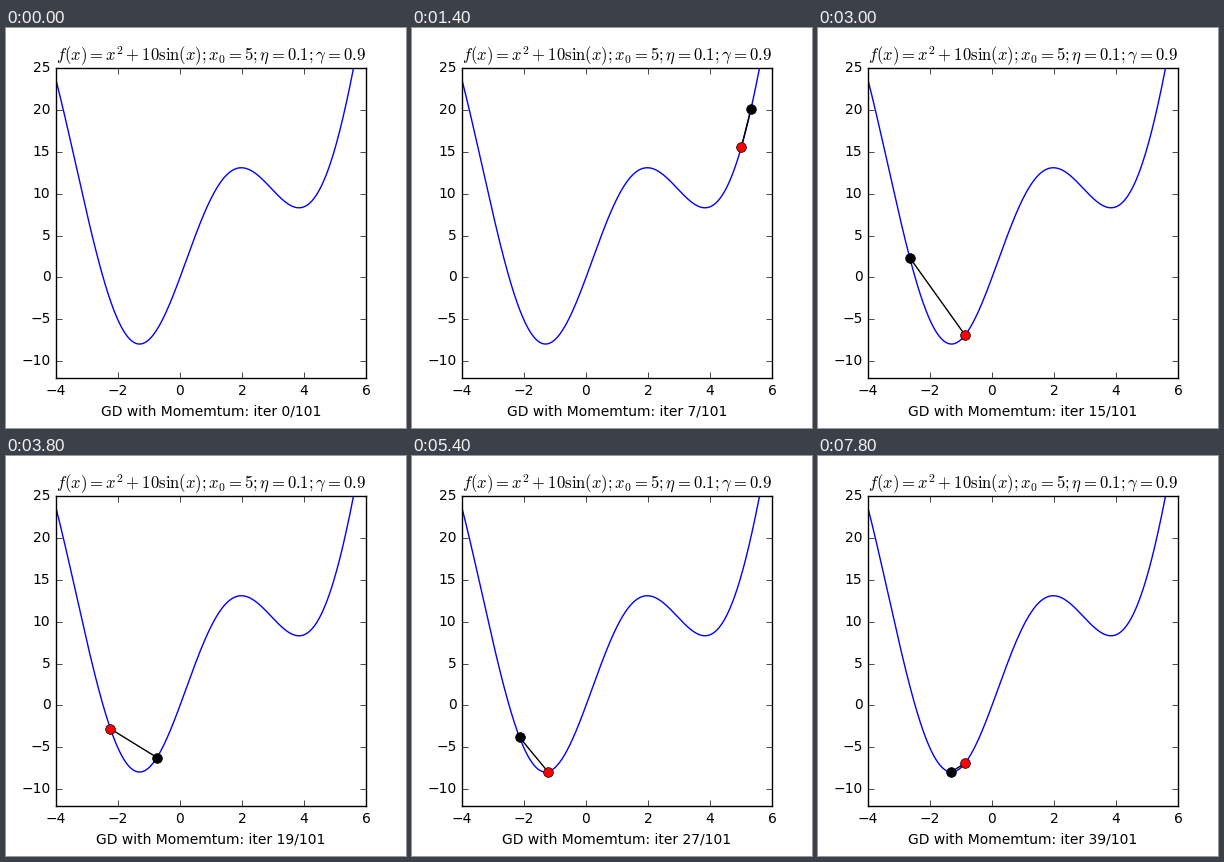
A matplotlib script for the animation above (8 s loop, 400x400 px).

```python
import numpy as np
import matplotlib.pyplot as plt
from matplotlib.animation import FuncAnimation

FRAMES, INTERVAL = 40, 200
START, RATE, MOMENTUM = -5.0, 0.1, 0.9

plt.style.use("classic")
plt.rcParams.update({
    "font.family": "DejaVu Sans",
    "font.size": 10,
    "figure.facecolor": "white",
    "savefig.facecolor": "white",
    "figure.dpi": 100,
    "savefig.dpi": 100,
})


def cost(x):
    return x**2 + 10 * np.sin(x)


def grad(x):
    return 2 * x + 10 * np.cos(x)


def descend(steps):
    """Positions visited by gradient descent with momentum."""
    path, v = [START], 0.0
    for _ in range(steps):
        v = MOMENTUM * v + RATE * grad(path[-1])
        path.append(path[-1] - v)
    return np.array(path)


path = descend(FRAMES)

fig = plt.figure(figsize=(4, 4), dpi=100)
ax = fig.add_axes([0.125, 0.125, 0.775, 0.775])
xs = np.linspace(-5, 6, 1000)
ax.plot(xs, cost(xs), "b")
before, = ax.plot([], [], "ko", markersize=7)
step, = ax.plot([], [], "k-")
now, = ax.plot([], [], "ro", markersize=7)
ax.set_xlim(-4, 6)
ax.set_ylim(-12, 25)
ax.set_title(r"$f(x) = x^2 + 10\sin(x); x_0 = 5; \eta = 0.1; \gamma = 0.9$")
label = ax.set_xlabel("")


def update(i):
    trail = path[max(i - 1, 0):i + 1]
    before.set_data(trail[:-1], cost(trail[:-1]))
    step.set_data(trail, cost(trail))
    now.set_data(trail[-1:], cost(trail[-1:]))
    label.set_text(f"GD with Momemtum: iter {i}/101")
    return before, step, now, label


anim = FuncAnimation(fig, update, frames=FRAMES, interval=INTERVAL,
                     init_func=lambda: update(0), repeat=True, repeat_delay=0)
plt.show()
```
